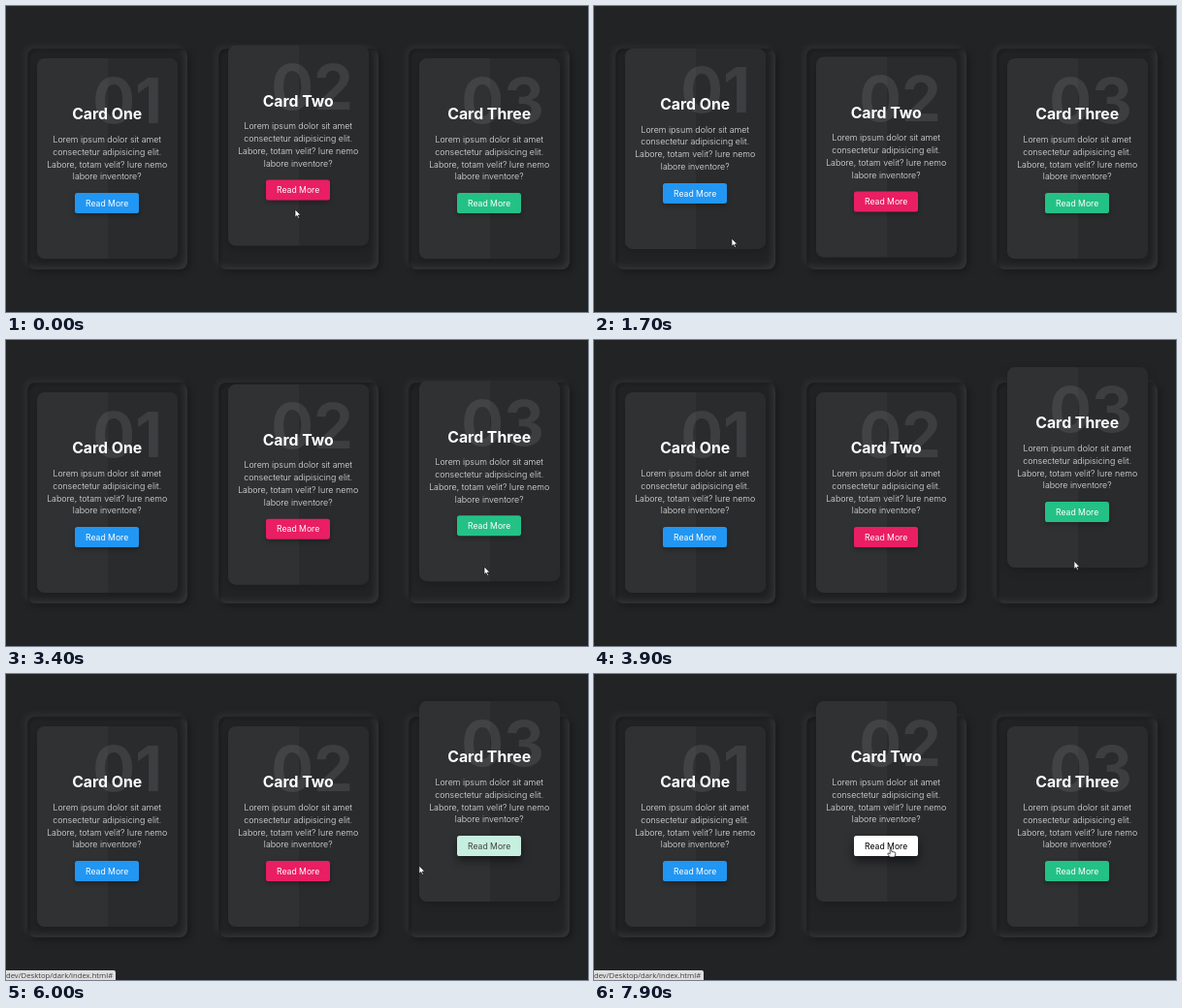
These frames come from a looping animation (600x316 px, 8 s). An HTML page:

```html
<!DOCTYPE html>
<html lang="en">
<head>
<meta charset="utf-8">
<title>Dark cards</title>
<style>
  html, body { margin: 0; width: 100%; height: 100%; overflow: hidden; background: #222325; }
  #stage { position: absolute; left: 0; top: 0; width: 600px; height: 316px; overflow: hidden; background: #222325; }
  .box {
    position: absolute; top: 43.5px; width: 165.8px; height: 228px; border-radius: 8px;
    box-shadow: inset 2.6px 2.6px 2.6px rgba(0,0,0,.2), inset -2.6px -2.6px 7.8px rgba(255,255,255,.085),
      2.6px 2.6px 7.8px rgba(0,0,0,.3), -2.6px -2.6px 7.8px rgba(255,255,255,.07);
  }
  .card {
    position: absolute; left: 10.4px; top: 10.4px; width: 145px; height: 207.2px; border-radius: 8px;
    background: linear-gradient(90deg, #303133 50.5%, #2a2b2d 50.5%);
    box-shadow: 0 2.6px 10px rgba(0,0,0,.2);
  }
  .card svg { position: absolute; left: 0; top: 0; overflow: visible; }
  .button {
    position: absolute; left: 39.1px; top: 139px; width: 66px; height: 21.6px; border-radius: 2.6px;
  }
  text { font-family: Inter, "Open Sans", sans-serif; text-anchor: middle; }
  .number { font-size: 65px; font-weight: 700; text-anchor: end; fill: rgba(255,255,255,.09); }
  .title { font-size: 15.8px; font-weight: 700; fill: #fff; }
  .line { font-size: 8.85px; font-weight: 300; fill: #e6e6e6; }
  .label { font-size: 8.65px; font-weight: 400; }
  #status {
    position: absolute; left: 0; top: 306px; width: 113px; height: 10px; background: #dededf;
    border-radius: 0 2px 0 0; color: #3c3c3e; font: 7.7px/10px "Open Sans", sans-serif; white-space: nowrap;
  }
  #cursor { position: absolute; left: 0; top: 0; overflow: visible; }
  #cursor path { fill: #fff; stroke: #111; stroke-width: .7; stroke-linejoin: round; }
</style>
</head>
<body>
<div id="stage">
  <div id="status">dev/Desktop/dark/index.html#</div>
  <svg id="cursor" width="12" height="12">
    <path id="arrow" d="M0 0V8.2L1.9 6.5L3.2 9.3L4.5 8.7L3.2 6H5.8Z"/>
    <path id="hand" d="M-.8 .8Q0 -.6 .8 .8V3.4L4 4Q5 4.3 4.8 5.6L4 9H-.9L-3.2 6Q-3.2 4.6 -2 5L-.8 5.8Z"/>
  </svg>
</div>
<script>
const LOOP = 8000, FADE = 500, LIFT = 25.9, STATUS_DELAY = 270;
const FIRST_X = 21.6, PITCH = 196.9, LINE_HEIGHT = 12.9;
const LINES = ['Lorem ipsum dolor sit amet', 'consectetur adipisicing elit.',
  'Labore, totam velit? Iure nemo', 'labore inventore?'];

// Spans are [pointer enters, pointer leaves] in ms: lifts for the card, hovers for its button.
const CARDS = [
  { title: 'Card One', rgb: [33, 150, 243], lifts: [[1580, 2720]], hovers: [] },
  { title: 'Card Two', rgb: [233, 30, 99], lifts: [[-150, 1350], [2790, 3205], [6280, LOOP]], hovers: [[7200, LOOP]] },
  { title: 'Card Three', rgb: [35, 193, 134], lifts: [[3265, 6060]], hovers: [[4845, 5910]] },
];

// Turning points of the pointer: time, x, y
const PATH = [
  [1150, 298, 210], [1700, 142, 240], [2300, 102, 226], [2550, 102, 226],
  [2800, 232, 226], [3400, 493, 234], [4450, 497, 222], [4900, 495, 183],
  [5800, 493, 180], [6000, 426, 198], [7200, 309, 187], [7700, 306, 180],
];

const $ = id => document.getElementById(id);
const mix = (a, b, p) => a + (b - a) * p;
const within = (spans, t) => spans.some(([from, to]) => t >= from && t < to);
const onButton = t => CARDS.some(card => within(card.hovers, t));

// cubic-bezier(.25, .1, .25, 1)
function ease(x) {
  if (x <= 0) return 0;
  if (x >= 1) return 1;
  const curve = (a, b, s) => 3 * a * s * (1 - s) ** 2 + 3 * b * s * s * (1 - s) + s ** 3;
  let low = 0, high = 1;
  for (let i = 0; i < 24; i++) {
    const mid = (low + high) / 2;
    if (curve(.25, .25, mid) < x) low = mid; else high = mid;
  }
  return curve(.1, 1, low);
}

function progress(spans, t) {
  return spans.reduce((sum, [from, to]) =>
    sum + ease((Math.min(t, to) - from) / FADE) * (1 - ease((t - to) / FADE)), 0);
}

function pointer(t) {
  const next = PATH.findIndex(key => key[0] > t);
  const [t1, x1, y1] = PATH.at(next);
  const [t0, x0, y0] = PATH[next - 1] || PATH.at(next);
  const p = t1 > t0 ? (t - t0) / (t1 - t0) : 0;
  return [mix(x0, x1, p), mix(y0, y1, p)];
}

function build(card, i) {
  const box = document.createElement('div');
  box.className = 'box';
  box.style.left = FIRST_X + i * PITCH + 'px';
  const lines = LINES.map((s, row) => `<text class="line" x="72.2" y="${86.7 + row * LINE_HEIGHT}">${s}</text>`).join('');
  box.innerHTML = `<div class="card"><div class="button"></div><svg width="145" height="207">
    <text class="number" x="129" y="66.5">0${i + 1}</text>
    <text class="title" x="72.2" y="63.4">${card.title}</text>${lines}
    <text class="label" x="72.1" y="152.8">Read More</text></svg></div>`;
  $('stage').insertBefore(box, $('status'));
  card.panel = box.querySelector('.card');
  card.button = box.querySelector('.button');
  card.label = box.querySelector('.label');
}

function draw(t) {
  for (const card of CARDS) {
    const hover = progress(card.hovers, t);
    const ink = Math.round(255 * (1 - hover));
    card.panel.style.transform = `translateY(${-LIFT * progress(card.lifts, t)}px)`;
    card.button.style.background = `rgb(${card.rgb.map(c => Math.round(mix(c, 255, hover)))})`;
    card.button.style.boxShadow = `0 ${mix(2.5, 5, hover)}px ${mix(5, 10, hover)}px rgba(0,0,0,${mix(.25, .55, hover)})`;
    card.label.style.fill = `rgb(${ink},${ink},${ink})`;
  }
  const [x, y] = pointer(t);
  const active = onButton(t);
  $('cursor').style.transform = `translate(${x}px, ${y}px)`;
  $('arrow').style.display = active ? 'none' : '';
  $('hand').style.display = active ? '' : 'none';
  $('status').style.display = onButton(t - STATUS_DELAY) ? '' : 'none';
}

CARDS.forEach(build);
const start = performance.now();
function tick() {
  draw((performance.now() - start) % LOOP);
  requestAnimationFrame(tick);
}
tick();
</script>
</body>
</html>
```
